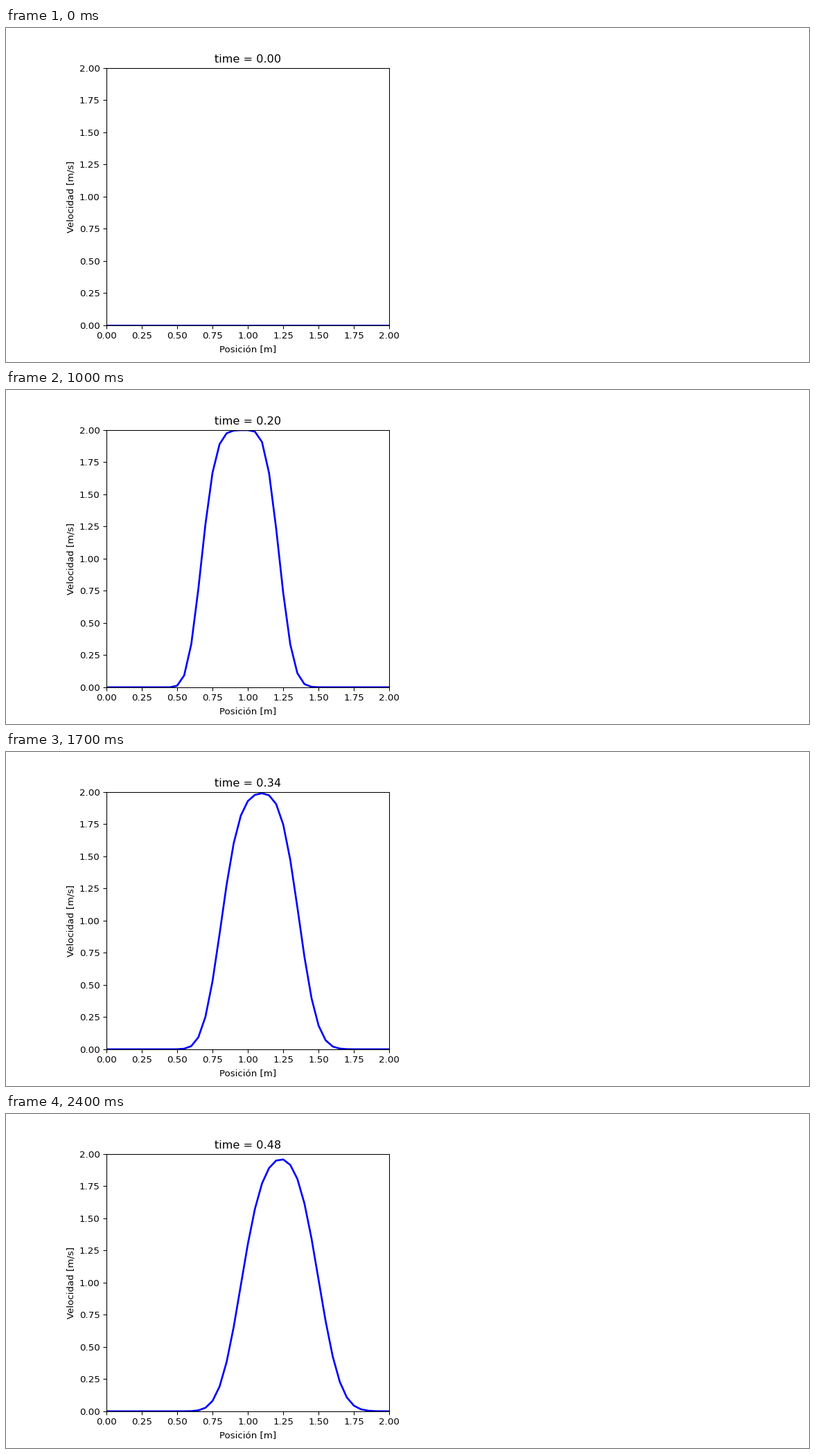
A matplotlib script for the animation above (2500 ms loop, 1159x483 px).

```python
import numpy as np
import matplotlib.pyplot as plt
from matplotlib.animation import FuncAnimation

FIG_SIZE, DPI = (12, 5), 96.6   # 1159 x 483 pixels
FRAMES, INTERVAL = 25, 100
LENGTH, NX = 2.0, 41
DT, COURANT = 0.02, 0.4

x = np.linspace(0, LENGTH, NX)


def square_pulse():
    u = np.zeros(NX)
    u[10:21] = 2.0
    return u


def advect(steps):
    """First-order upwind transport of the pulse."""
    u = square_pulse()
    for _ in range(steps):
        u[1:] -= COURANT * (u[1:] - u[:-1])
    return u


plt.rcParams["font.family"] = "DejaVu Sans"
fig = plt.figure(figsize=FIG_SIZE, dpi=DPI, facecolor="white")
ax = fig.add_subplot(1, 2, 1)
ax.set_xlim(0, LENGTH)
ax.set_ylim(0, 2)
ax.set_xlabel("Posición [m]")
ax.set_ylabel("Velocidad [m/s]")
title = ax.set_title("time = 0.00")
line, = ax.plot(x, np.zeros(NX), color="blue", lw=2)


def draw(step):
    # The loop opens on a flat line before the pulse appears.
    line.set_ydata(advect(step) if step else np.zeros(NX))
    title.set_text(f"time = {step * DT:.2f}")
    return line, title


def reset():
    return draw(0)


anim = FuncAnimation(fig, draw, frames=FRAMES, init_func=reset,
                     interval=INTERVAL, repeat=True, repeat_delay=0)
plt.show()
```
